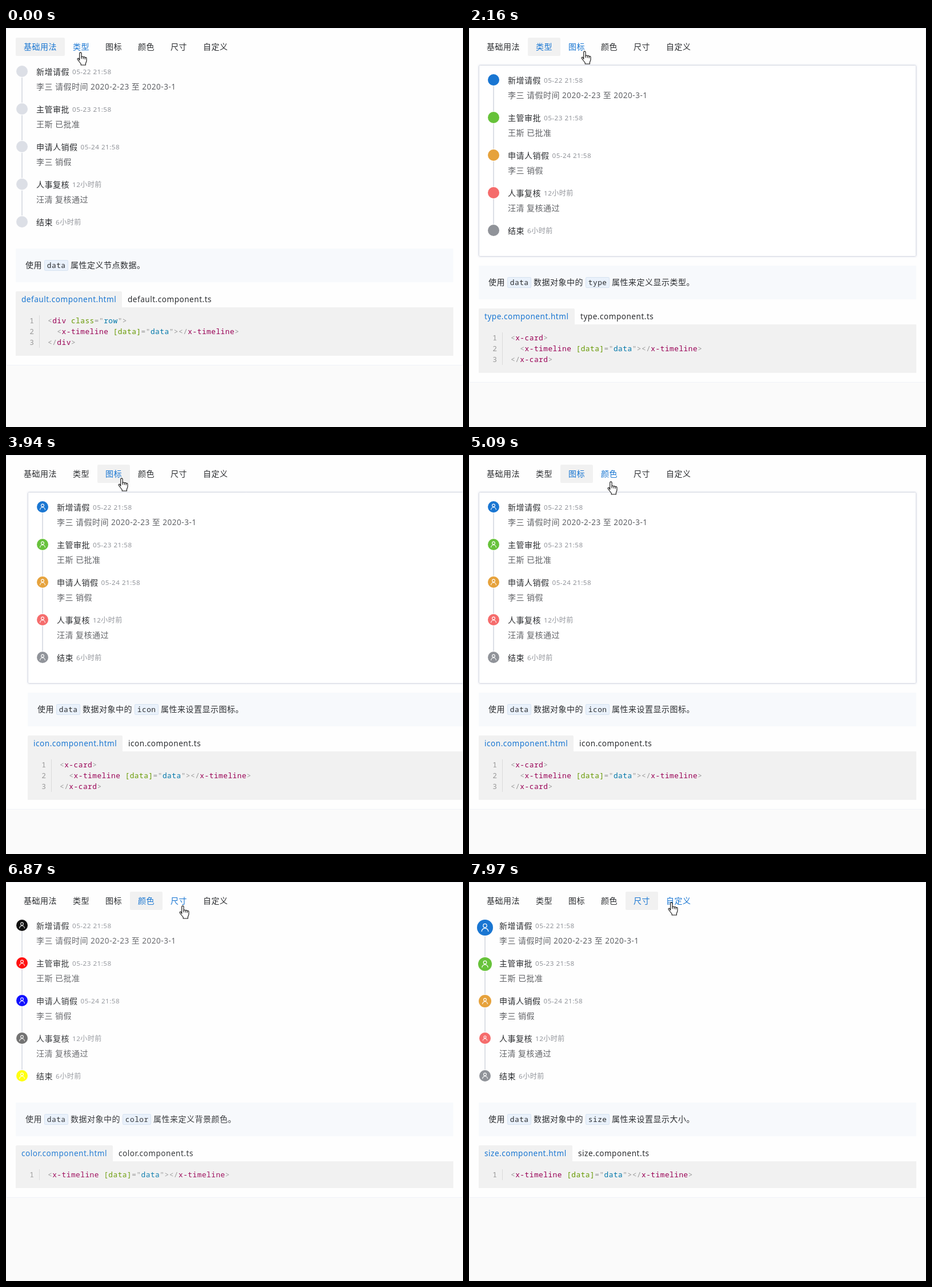
Recreate the animation shown at these times as an HTML page with a canvas. Size 800 by 700 pixels, loop 8 s.

```html
<!DOCTYPE html>
<html lang="zh">
<head>
<meta charset="utf-8">
<title>Timeline</title>
<style>
html, body { margin: 0; width: 100%; height: 100%; overflow: hidden; background: #fafafa; }
canvas { display: block; }
</style>
</head>
<body>
<canvas id="stage" width="800" height="700"></canvas>
<script>
const ctx = document.getElementById('stage').getContext('2d', { alpha: false });
const LOOP = 8000;
const CJK = '"Noto Sans CJK SC", "Noto Sans CJK", sans-serif';
const LATIN = '"Noto Sans", "Open Sans", sans-serif';
const MONO = '"Noto Sans Mono", "DejaVu Sans Mono", monospace';
const BLUE = '#1976d2', INK = '#2b2d30', LINE = '#dcdfe6';
const TYPES = [BLUE, '#67c23a', '#e6a23c', '#f56c6c', '#909399'];

const tabs = ['基础用法', '类型', '图标', '颜色', '尺寸', '自定义'];
const events = [
  ['新增请假', '05-22 21:58', '李三 请假时间 2020-2-23 至 2020-3-1'],
  ['主管审批', '05-23 21:58', '王斯 已批准'],
  ['申请人销假', '05-24 21:58', '李三 销假'],
  ['人事复核', '12小时前', '汪清 复核通过'],
  ['结束', '6小时前', '']
];
const tag = '<x-timeline [data]="data"></x-timeline>';
const carded = ['<x-card>', '  ' + tag, '</x-card>'];
const pages = [
  { name: 'default', tip: '使用 `data` 属性定义节点数据。', colors: Array(5).fill(LINE),
    code: ['<div class="row">', '  ' + tag, '</div>'] },
  { name: 'type', tip: '使用 `data` 数据对象中的 `type` 属性来定义显示类型。', colors: TYPES,
    card: true, code: carded },
  { name: 'icon', tip: '使用 `data` 数据对象中的 `icon` 属性来设置显示图标。', colors: TYPES,
    card: true, icon: true, code: carded },
  { name: 'color', tip: '使用 `data` 数据对象中的 `color` 属性来定义背景颜色。', icon: true,
    colors: ['#000', '#f00', '#00f', '#696969', '#ff0'], code: [tag] },
  { name: 'size', tip: '使用 `data` 数据对象中的 `size` 属性来设置显示大小。', icon: true,
    colors: TYPES, radii: [14, 12, 11, 10, 10], icons: [16, 14, 12, 10, 12], code: [tag] }
];

// Bursts of movement: start, end, number of steps
const bursts = [
  [0, 0, 1], [70, 70, 1], [1470, 2160, 10], [3650, 4330, 10], [5090, 5860, 11],
  [6030, 6260, 4], [6870, 7660, 11], [7730, 7970, 4]
];
// Pointer: time, x, y
const track = [
  [0, 124, 42], [69, 124, 42], [70, 124, 39], [1850, 124, 39], [2160, 196, 40],
  [4050, 196, 40], [4330, 242, 46], [5080, 242, 46], [5166, 239, 42], [5620, 239, 42],
  [5860, 297, 51], [5960, 297, 51], [6260, 303, 41], [7420, 303, 41],
  [7660, 309, 48], [7670, 309, 48], [7970, 348, 35]
];
// Times at which the next page starts to slide in
const enters = [1582, 3762, 5346, 6982];
const LEAVE = 120, ENTER = 271;

const hand = new Path2D('M4.7 14.5V2.6a1.7 1.7 0 0 1 3.4 0v6.2c.4-1.2 2.9-1.2 3.2.4.6-1 2.7-.8 2.9.7' +
  '.9-.8 2.8-.4 2.8 1.3v4.3c0 1.8-1.6 3.6-1.6 5.2v2.3H7.2v-1.9C6.3 19.3 2.7 15.7 1.2 13.1c-.8-1.5 1-2.6 2.2-1.4z');
const knuckles = new Path2D('M8.1 8.8v3.5M11.3 9.5v3M14.2 10.3v2.6');

ctx.letterSpacing = '0.5px';

function rect(x, y, w, h, color, radii = 0) {
  ctx.fillStyle = color;
  ctx.beginPath();
  ctx.roundRect(x, y, w, h, radii);
  ctx.fill();
}

function frame(x, y, w, h, color, radius = 0) {
  ctx.strokeStyle = color;
  ctx.lineWidth = 1;
  ctx.beginPath();
  ctx.roundRect(x + 0.5, y + 0.5, w - 1, h - 1, radius);
  ctx.stroke();
}

function put(s, x, y, font, color) {
  ctx.font = font;
  ctx.fillStyle = color;
  ctx.fillText(s, x, y);
  return x + ctx.measureText(s).width;
}

// Mixed Chinese and Latin text; returns the right end
function text(s, x, y, color, size = 14) {
  for (const [run] of s.matchAll(/[⺀-鿿]+|[^⺀-鿿]+/g)) {
    const font = /[⺀-鿿]/.test(run) ? `${size}px ${CJK}` : `${size * 0.971}px ${LATIN}`;
    x = put(run, x, y, font, color);
  }
  return x;
}

const mono = (s, x, y, color) => put(s, x, y, '12.8px ' + MONO, color);

function person(x, y, size) {
  const k = size / 12;
  ctx.strokeStyle = '#fff';
  ctx.lineWidth = 1.1 * Math.sqrt(k);
  ctx.beginPath();
  ctx.arc(x, y - 2.5 * k, 2.4 * k, 0, 7);
  ctx.moveTo(x - 4.4 * k, y + 5.2 * k);
  ctx.arc(x, y + 5.2 * k, 4.4 * k, Math.PI, 0);
  ctx.stroke();
}

function timeline(page, x, y) {
  const radius = i => page.radii ? page.radii[i] : 10;
  events.forEach(([title, date, note], i) => {
    const top = y + i * 66, r = radius(i), cx = x + 11;
    if (i < 4) rect(cx - 1, top + 2 * r + 1, 2, 64 - 2 * r, LINE);
    ctx.fillStyle = page.colors[i];
    ctx.beginPath();
    ctx.arc(cx, top + r, r, 0, 7);
    ctx.fill();
    if (page.icon) person(cx, top + r, page.icons ? page.icons[i] : 12);
    const end = text(title, x + 36, top + 16, INK);
    text(date, end + 5, top + 15, '#909399', 12);
    text(note, x + 36, top + 42, '#606266');
  });
}

function tipBox(s, x, y) {
  rect(x, y, 766, 59, '#f7f9fc');
  let end = x + 17;
  s.split('`').forEach((part, i) => {
    if (i % 2) {
      ctx.font = '12.8px ' + MONO;
      const w = Math.round(ctx.measureText(part).width + 9.2);
      const left = Math.round(end);
      rect(left, y + 20, w, 19, '#e9f1fb', 2);
      frame(left, y + 20, w, 19, '#d6e2f0', 2);
      mono(part, left + 4.8, y + 34, INK);
      end = left + w;
    } else {
      end = text(part, end, y + 34, INK);
    }
  });
}

function codeLine(s, x, y) {
  let prev = '';
  for (const [token, mark, word] of s.matchAll(/(<\/?|[>="]+)|(\[?\w[\w-]*\]?)| +/g)) {
    let color = '#999';
    if (word) color = prev[0] === '<' ? '#990055' : prev.endsWith('"') ? '#0077aa' : '#669900';
    x = mono(token, x, y, color);
    prev = token;
  }
}

function codeBox(page, x, y) {
  const html = page.name + '.component.html', lines = page.code;
  ctx.font = `13.6px ${LATIN}`;
  const w = Math.round(ctx.measureText(html).width) + 20;
  rect(x, y, w, 28, '#f1f1f1', [2, 2, 0, 0]);
  text(html, x + 10, y + 19, BLUE);
  text(page.name + '.component.ts', x + w + 10, y + 19, INK);
  rect(x, y + 28, 766, lines.length * 19 + 28, '#f1f1f1');
  rect(x + 41, y + 42, 1, lines.length * 19, '#dadada');
  lines.forEach((line, i) => {
    const base = y + 56 + i * 19;
    mono(String(i + 1), x + 24.3, base, '#999');
    codeLine(line, x + 56, base);
  });
}

function drawPage(page, shift, alpha) {
  const x = 17 + shift, pad = page.card ? 15 : 0;
  ctx.save();
  ctx.beginPath();
  ctx.rect(0, 0, 799, 700);
  ctx.clip();
  ctx.globalAlpha = alpha;
  if (page.card) {
    ctx.save();
    ctx.shadowColor = 'rgba(120,130,170,.35)';
    ctx.shadowBlur = 3;
    rect(x, 65, 766, 336, '#fff', 2);
    ctx.restore();
    frame(x, 65, 766, 336, '#d9dce5', 2);
  }
  timeline(page, x + pad, 66 + pad);
  tipBox(page.tip, x, 387 + 2 * pad);
  codeBox(page, x, 462 + 2 * pad);
  ctx.restore();
}

function drawTabs(active, px, py) {
  let x = 17;
  tabs.forEach((label, i) => {
    const w = 28 + label.length * 14.5;
    const hover = px >= x && px < x + w && py >= 17 && py < 49;
    if (i === active) rect(x, 17, w, 32, '#f1f1f1', 2);
    text(label, x + 14, 38, hover || i === active ? BLUE : INK);
    x += w;
  });
}

function pointerAt(t) {
  const i = track.findIndex(k => k[0] > t);
  if (i < 0) return track[track.length - 1].slice(1);
  const [t0, x0, y0] = track[i - 1], [t1, x1, y1] = track[i];
  const p = (t - t0) / (t1 - t0);
  return [Math.round(x0 + (x1 - x0) * p), Math.round(y0 + (y1 - y0) * p)];
}

function drawPointer(x, y) {
  ctx.save();
  ctx.translate(x, y);
  ctx.fillStyle = '#fff';
  ctx.strokeStyle = '#111';
  ctx.lineWidth = 1.1;
  ctx.lineJoin = 'round';
  ctx.fill(hand);
  ctx.stroke(hand);
  ctx.stroke(knuckles);
  ctx.restore();
}

// The picture updates in steps and rests between bursts
function stepped(t) {
  const [start, end, n] = bursts.findLast(b => b[0] <= t);
  if (n < 2) return end;
  const dt = (end - start) / (n - 1);
  return Math.min(end, start + Math.floor((t - start) / dt + 0.2) * dt);
}

function draw(time) {
  const t = stepped(time);
  const current = enters.filter(e => t >= e).length;
  const active = enters.filter(e => t >= e - LEAVE + 50).length;
  const page = pages[current];

  let shift = 0, alpha = 1;
  if (current) {
    const rest = (1 - Math.min(1, (t - enters[current - 1]) / ENTER)) ** 3;
    shift = Math.round(800 * rest);
    alpha = 1 - rest ** 1.4;
  }
  const left = (enters[current] ?? Infinity) - t;
  if (left < LEAVE) alpha = left / LEAVE;

  const height = 535 - 1 + page.code.length * 19 + (page.card ? 30 : 0) + 1;
  const [x, y] = pointerAt(t);
  rect(0, 0, 800, 700, '#fafafa');
  rect(0, 0, 800, height, '#fefefe');
  drawPage(page, shift, alpha);
  frame(0, 0, 800, height, '#f0f2f8');
  drawTabs(active, x + 6, y + 1);
  drawPointer(x, y);
}

const begin = performance.now();
function tick() {
  draw((performance.now() - begin) % LOOP);
  requestAnimationFrame(tick);
}
tick();
</script>
</body>
</html>
```
